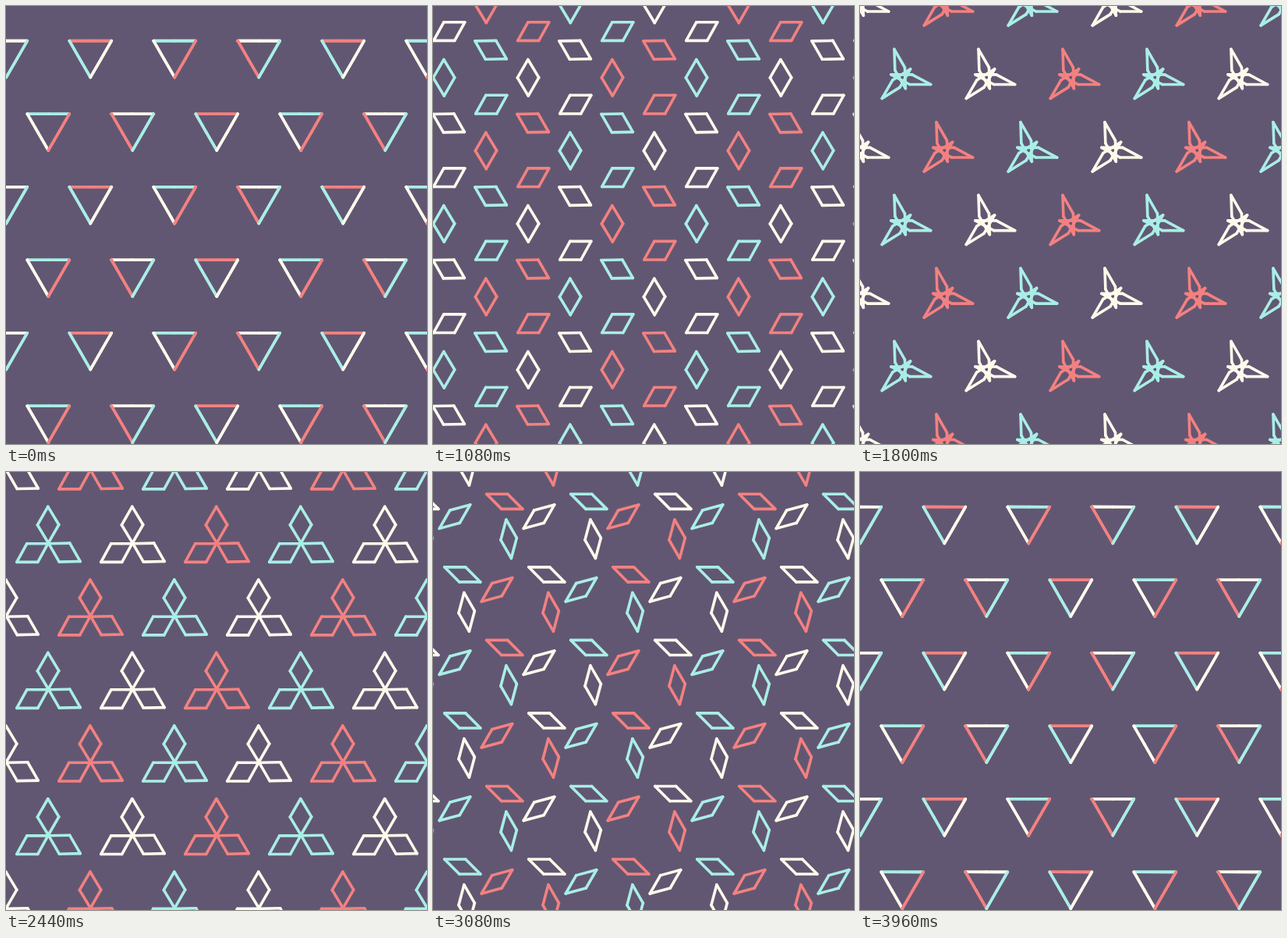
An HTML page without scripts for the animation above (4000 ms loop, 540x561 px).

```html
<!DOCTYPE html>
<html lang="en">
<head>
<meta charset="utf-8">
<title>Rhombus linkage</title>
<style>
  html, body { margin: 0; width: 100%; height: 100%; overflow: hidden; background: #625772; }
  svg { display: block; width: 540px; height: 561px; }
  .grid { fill: none; stroke-width: 3.6; stroke-linecap: round; }
  .mint { stroke: #a9eee6; }
  .cream { stroke: #fefaec; }
  .coral { stroke: #f38181; }
</style>
</head>
<body>
<svg viewBox="0 0 540 561">
  <defs>
    <!-- Side that turns with the crank -->
    <g id="turning">
      <path d="M-13.5-23.383h27"/>
      <animateTransform attributeName="transform" type="rotate" values="-180;-540" dur="4s"
        calcMode="spline" keyTimes="0;1" keySplines=".3642 0 .6358 1" repeatCount="indefinite"/>
    </g>

    <!-- Side that keeps its direction -->
    <g id="level">
      <path d="M-13.5 0h27"/>
      <animateTransform attributeName="transform" type="rotate" values="180;540" dur="4s"
        calcMode="spline" keyTimes="0;1" keySplines=".3642 0 .6358 1" repeatCount="indefinite"/>
    </g>

    <!-- Rhombus with sides of 27, its middle circling through the hub -->
    <g id="rhombus" transform="translate(0 23.383)">
      <use href="#turning" x="-13.5"/>
      <use href="#turning" x="13.5"/>
      <g>
        <use href="#level" x="-13.5" y="-23.383"/>
        <use href="#level" x="13.5" y="-23.383"/>
        <animateTransform attributeName="transform" type="rotate" values="-180;-540" dur="4s"
          calcMode="spline" keyTimes="0;1" keySplines=".3642 0 .6358 1" repeatCount="indefinite"/>
      </g>
    </g>

    <g id="star">
      <use href="#rhombus"/>
      <use href="#rhombus" transform="rotate(120)"/>
      <use href="#rhombus" transform="rotate(240)"/>
    </g>

    <g id="even">
      <use href="#star" class="cream"/>
      <use href="#star" class="coral" x="108"/>
      <use href="#star" class="mint" x="216"/>
      <use href="#star" class="cream" x="324"/>
      <use href="#star" class="coral" x="432"/>
      <use href="#star" class="mint" x="540"/>
    </g>

    <g id="odd">
      <use href="#star" class="coral" x="-54"/>
      <use href="#star" class="mint" x="54"/>
      <use href="#star" class="cream" x="162"/>
      <use href="#star" class="coral" x="270"/>
      <use href="#star" class="mint" x="378"/>
      <use href="#star" class="cream" x="486"/>
      <use href="#star" class="coral" x="594"/>
    </g>
  </defs>

  <rect width="540" height="561" fill="#625772"/>
  <g class="grid" transform="translate(.3 -2.1)">
    <use href="#even"/>
    <use href="#odd" y="93.531"/>
    <use href="#even" y="187.061"/>
    <use href="#odd" y="280.592"/>
    <use href="#even" y="374.123"/>
    <use href="#odd" y="467.654"/>
    <use href="#even" y="561.184"/>
  </g>
</svg>
</body>
</html>
```
